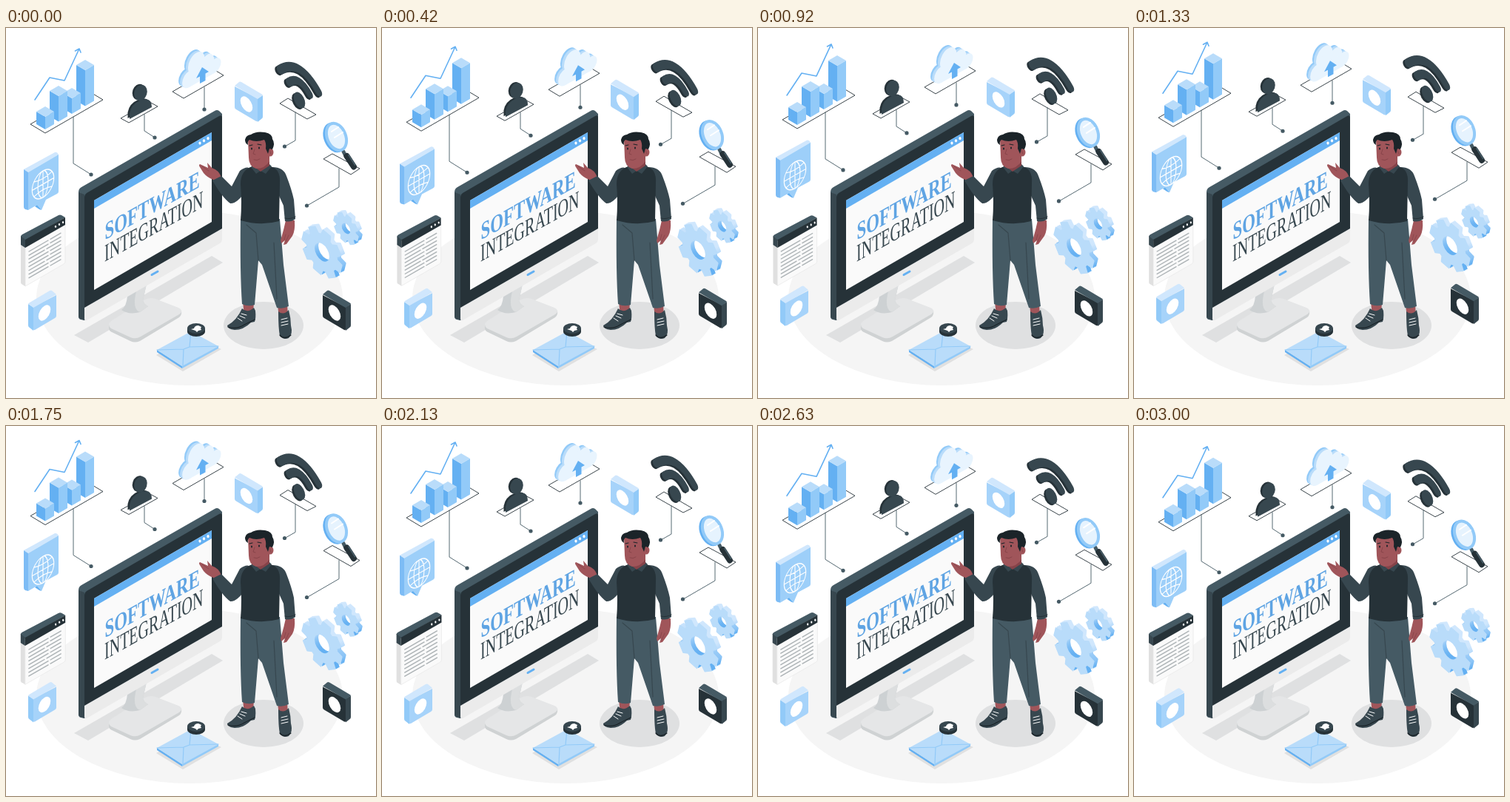
An HTML page for the animation above (3.04 s loop, 500 by 500 pixels).

```html
<!DOCTYPE html>
<html lang="en">
<head>
<meta charset="utf-8">
<title>Software integration</title>
<style>
html, body { margin: 0; width: 100%; height: 100%; overflow: hidden; background: #fff }
svg { display: block; width: 100%; height: 100% }
text { font: 33px "Liberation Serif", serif }
.bold { font-weight: 700 }
</style>
</head>
<body>
<svg id="stage" viewBox="0 0 500 500"></svg>
<script>
const NAVY = '#263238', SLATE = '#37474f', STEEL = '#455a64', BLACK = '#1b2429';
const BLUE = '#64b0f2', SKY = '#92caf8', SOFT = '#a6d3fa', PALE = '#b9dcfa', MIST = '#d0e7fd';
const SKIN = '#a0555a', SHADE = '#864349';
const LOOP = 3040;

const path = (d, fill, extra = '') => `<path d="${d}" fill="${fill}" ${extra}/>`;
const line = (d, color, width = 1) =>
  path(d, 'none', `stroke="${color}" stroke-width="${width}" stroke-linecap="round" stroke-linejoin="round"`);
const oval = (x, y, rx, ry, fill, extra = '') =>
  `<ellipse cx="${x}" cy="${y}" rx="${rx}" ry="${ry}" fill="${fill}" ${extra}/>`;
const group = (transform, body) => `<g transform="${transform}">${body}</g>`;
const rise = (height, body) => `<g data-rise="${height}">${body}</g>`;
// Isometric walls: one climbs to the right, the other falls to the right.
const wallUp = (x, y, body) => group(`matrix(.866 -.5 0 1 ${x} ${y})`, body);
const wallDown = (x, y, body) => group(`matrix(.866 .5 0 1 ${x} ${y})`, body);

// Outlined platform with its connector and end dot.
const platform = (outline, wire, x, y) =>
  path(outline, '#fff', `stroke="${NAVY}" stroke-width=".9"`) +
  line(wire, STEEL, .9) + oval(x, y, 2.6, 2.6, STEEL);

const bar = (x, top, bottom) =>
  path(`M${x} ${top + 7}l12 7V${bottom}l-12-7z`, BLUE) +
  path(`M${x + 12} ${top + 14}l12-7V${bottom - 7}l-12 7z`, SKY) +
  path(`M${x} ${top + 7}l12-7 12 7-12 7z`, PALE);

// Cube badge with a plain round sign on its face.
const tile = (x, y, flip, face, side, top) =>
  group(`translate(${x} ${y}) scale(${flip ? -1 : 1} 1)`,
    path('M0 7V35q0 2 2 3L29 54q2 1 2-1V23z', face) +
    path('M31 23l7-4V48q0 2-2 3l-5 4z', side) +
    path('M0 6L6 1q1-1 3 0L36 17q2 1 2 2l-7 5z', top) +
    wallDown(16, 31, oval(0, 0, 9.5, 9.5, '#fff')));

function gear(x, y, r) {
  let d = '';
  for (let i = 0; i < 8; i++)
    [[-.3, .76], [-.19, 1], [.19, 1], [.3, .76]].forEach(([a, k]) => {
      const t = i * Math.PI / 4 + a + .25;
      d += `${d ? 'L' : 'M'}${(r * k * Math.cos(t)).toFixed(2)} ${(r * k * Math.sin(t)).toFixed(2)}`;
    });
  const h = r * .4;
  d += `ZM${h} 0A${h} ${h} 0 1 0 ${-h} 0A${h} ${h} 0 1 0 ${h} 0Z`;
  const layer = (dx, fill) => wallDown(x + dx, y - dx * .57,
    path(d, fill, `fill-rule="evenodd" stroke="${fill}" stroke-width="2" stroke-linejoin="round"`));
  return [5, 3.5, 2].map(dx => layer(dx, 'url(#depth)')).join('') + layer(0, PALE);
}
const depth = `<linearGradient id="depth" x2="0" y2="1"><stop offset=".25" stop-color="${MIST}"/>` +
  `<stop offset=".7" stop-color="${BLUE}"/></linearGradient>`;

const floor =
  oval(248, 365, 207, 118, '#f5f5f5') +
  path('M92 415L278 308l15 9L111 425z', '#dfe0e1') +
  oval(348, 402, 54, 32, '#dfe0e1');

const chart =
  platform('M33 130L111 85l20 12L53 142z', 'M91 120V183L115 198', 115, 198) +
  bar(95, 43, 105.5) + bar(77, 81, 116) + bar(59, 78, 126.5) + bar(41, 106, 137) +
  line('M39 97L59 67 79 71 99 28M93.5 31l5.500-3 2 5', BLUE, 1.6);

const bust = color => path('M167 123V115Q169 103 181 98Q197 92 197 107z', color) +
  oval(182, 87.5, 8.5, 11, color, 'transform="rotate(18 182 87.5)"');
const user =
  platform('M155 122l11 6 39-22-11-6z', 'M187 117V139L201 148', 201, 148) +
  group('translate(-2.500 -1)', bust(NAVY)) + bust(SLATE);

const puff = fill =>
  oval(10, -11, 11, 11, fill) + oval(21, -27, 13, 14, fill) + oval(38, -17, 11, 13, fill) +
  oval(50, -9, 9.5, 9.5, fill) + path('M10-22L25-35 42-17 50 .5 10 0z', fill);
const cloud =
  platform('M225 86l15 9 54-31-15-9z', 'M268 80V109', 268, 110) +
  wallUp(234, 82, puff(SKY)) + wallUp(236, 83.500, puff(PALE)) + wallUp(239, 85, puff('#e8f4fe')) +
  path('M257 68L265 53 274 59 269.500 61.500V71L262 75V65.500z', BLUE);

const waves = color =>
  line('M-30-25Q0-57 30-25', color, 11) + line('M-16-15Q0-33 16-15', color, 10.5) +
  oval(0, 1, 9, 10, color);
const wifi =
  platform('M370 102l11-7 38 22-12 6z', 'M391 114V152L377 160', 376.500, 160) +
  wallDown(394, 98, waves(NAVY)) + wallDown(396.500, 96.500, waves(SLATE));

const ring = (x, y, color, fill) =>
  oval(x, y, 12.5, 19, fill, `stroke="${color}" stroke-width="4" transform="rotate(-22 ${x} ${y})"`);
const magnifier =
  platform('M429 177l12-7 37 20-12 8z', 'M450 190V215L407 240', 406.500, 240) +
  line('M456 167L460 175', STEEL, 5) + line('M460.500 173L470 187.500', NAVY, 8) +
  line('M463 171.500L471.500 185', STEEL, 2) +
  ring(444, 148, BLUE, 'none') + ring(446.500, 147, SKY, '#e6f3fe') +
  line('M440 140L449 134M444 148L455 141', '#fff', 2);

const bubble =
  path('M24 191L66 168q3-1 5 3L30 195z', MIST) +
  path('M24 191l6 4V246l-4-1q-2-1-2-3z', '#7dbcf5') +
  path('M30 195L71 171V221q0 2-2 3L54 232 48 246 42 239 30 246z', '#9dcff9') +
  path('M42 239l6 7-3-1-6-4z', BLUE);
const globe = wallUp(50, 211, line(
  'M-17 0a17 18 0 1 0 34 0a17 18 0 1 0-34 0M-8 0a8 18 0 1 0 16 0a8 18 0 1 0-16 0' +
  'M0-18V18M-17 0H17M-14-10Q0-5 14-10M-14 10Q0 5 14 10', '#fff', 1.3));

let rows = '';
for (let i = 0; i < 8; i++) {
  const gap = i % 3 == 2 ? 52 : 57;
  const at = x => `${x} ${(302 + i * 5.1 - (x - 31) * .577).toFixed(1)}`;
  rows += line(`M${at(31)}L${at(gap)}M${at(gap + 3)}L${at(74)}`, '#adb3b6', 1.4);
}
const page =
  path('M20 291l6 5V349l-5-3q-1-1-1-2z', '#e0e0e0') +
  path('M26 296L80 265V316q0 2-2 3L26 349z', '#fafafa', 'stroke="#e4e4e4" stroke-width=".6"') +
  path('M20 282q0-2 2-3L71 253q2-1 4 0l5 3L26 287z', STEEL) +
  path('M20 281l6 5V297l-6-4z', SLATE) +
  path('M26 286L80 256V266L26 297z', NAVY) +
  [67, 72, 77].map(x => oval(x, 292 - (x - 26) * .577, 1.1, 1.6, '#fff')).join('') + rows;

const envelope =
  path('M203 442L251 415 291 434 239 464z', '#e0e0e0') +
  path('M204 435V438L238 460V457z', BLUE) + path('M238 456V460L287 433V430z', SKY) +
  path('M204 435L250 410 287 430 238 457z', PALE) +
  line('M204 435L240 434 248 431 287 430M240 434L239 456M248 431L250 410', SKY, 1.2) +
  path('M245 406V410a12 7 0 0 0 24 0V406z', NAVY) + oval(257, 406, 12, 7, SLATE) +
  path('M250 407l4-1q1-4 6-4l4 2-1 2 1 2-4 1-2 2-2-2z', '#fff');

const monitor =
  path('M139 400V406q0 3 4 5L168 423q6 3 13 0L234 391q4-3 3-9z', '#cfd2d3') +
  path('M142 396L186 368q8-5 16-2L233 378q8 4 1 9L182 417q-7 4-14 1L142 406q-6-5 0-10z', '#e5e6e7') +
  path('M164 362L190 346 185 368Q186 373 192 376L181 384Q166 388 156 381Q163 376 164 362z', '#cdd1d3') +
  path('M176 356L190 346 185 368Q186 373 192 376L181 384Q170 380 176 356z', '#dcdedf') +
  path('M98 222q0-5 4-7L282 112q3-2 6 0l4 4V280L106 395l-5-1q-3-1-3-4z', STEEL) +
  path('M98 222l8 3V395l-5-2q-3-1-3-4z', SLATE) +
  path('M106 228q0-3 3-5L288 119q4-2 4 2V271L106 378z', NAVY) +
  path('M106 378L292 271V286q0 3-3 5L109 395q-3 1-3-2z', '#ebebeb') +
  path('M119 233L278 141V262L119 354z', '#fafafa') +
  path('M119 233L278 141V152L119 244z', BLUE) +
  [262, 267.500, 273].map(x => oval(x, 238.500 - (x - 119) * .58, 1.6, 2.1, '#fff')).join('') +
  line('M197 333.500L205 329', BLUE, 3) +
  group('matrix(.693 -.388 0 1 133.500 286.500)', '<text class="bold" fill="#5fa4e3">SOFTWARE</text>') +
  group('matrix(.607 -.338 0 1 133 316)', `<text fill="${SLATE}">INTEGRATION</text>`);

const man =
  // feet and shoes
  path('M320 370H335L334 386 322 388zM367 374L380 373 381 390 369 392z', SKIN) +
  path('M319 379Q326 386 335 378L337 382Q338 392 336 397L331 398Q321 408 309 408Q299 407 299 402Q312 395 319 379z', SLATE) +
  line('M300 404Q311 408 322 401L336 394', BLACK, 1.2) +
  line('M313 392l6 4M316 389l7 3M318 386l7 2', '#fff', 1) +
  path('M368 383Q375 389 382 381Q385 392 385 402Q388 414 382 419Q375 422 370 416Q368 406 368 383z', SLATE) +
  line('M370 415Q376 422 385 415', BLACK, 1.2) +
  line('M372 394l8-2M372 398l9-2M372 402l9-2', '#fff', 1) +
  // trousers
  path('M317 258H370L375 320 382 376Q374 380 366 378L346 320 341 314 336 374Q327 377 319 373Q316 330 317 258z', STEEL) +
  line('M341 314L338 277 325 266M366 366L362 290', SLATE, 1.2) +
  // far arm and hand
  path('M378 260H390Q391 274 387 281L379 292 375 293 377 287 372 291 371 287 375 273z', SKIN) +
  line('M378 279L376 286M382 280L378 289', SHADE, .8) +
  path('M360 188Q375 188 379 200Q386 218 389 232L391 258Q385 263 377 261L375 240 365 218z', SLATE) +
  line('M377 257Q384 259 391 255', NAVY, 1) +
  // raised arm and hand
  path('M291 202Q288 192 278 189L272 182 273 189 262 184Q260 185 262 188L267 196Q272 202 280 205L283 209z', SKIN) +
  line('M265 187L274 193', SHADE, .8) +
  path('M279 206L291 200 305 214 316 193Q326 185 332 191L325 219Q312 238 303 237Q292 229 279 206z', SLATE) +
  // sweater, collar and neck
  path('M330 188L357 187Q371 190 370 209L369 261Q344 268 317 260Q319 235 317 211Q317 194 330 188z', NAVY) +
  path('M331 188L335 182 355 183 359 187 351 197 344 193 338 197z', SLATE) +
  path('M335 176L356 170V186L344 194 335 187z', SHADE) +
  // head
  path('M327 150Q343 145 354 152L356 180Q350 190 338 190Q328 187 328 175z', SKIN) +
  oval(357, 168, 4.5, 5.5, SKIN) +
  path('M323 151Q324 145 331 144Q338 139 350 141Q360 143 360 150Q364 156 360 164L356 163 354 170 351 163Q352 155 349 151Q338 155 329 151Q326 153 327 158Q323 156 323 151z', BLACK) +
  oval(332, 163, 1, 1.5, BLACK) + oval(342, 162, 1, 1.5, BLACK) +
  line('M329 159l4-1M340 157l5 1', BLACK, 1.1) +
  line('M336 164l-2 6 3 1M335 178Q339 180 343 177M356 166l2 4', SHADE, .9);

const stage = document.getElementById('stage');
stage.innerHTML = depth + floor +
  [chart, user, cloud, wifi, magnifier,
    tile(309, 72, false, SOFT, SKY, MIST),
    tile(68, 354, true, SOFT, SKY, MIST),
    tile(428, 354, false, NAVY, SLATE, STEEL),
    gear(459.5, 271, 19), gear(427, 303, 31)].map(part => rise(10, part)).join('') +
  rise(27, bubble) + rise(20, globe) +
  `<g id="page">${page}</g>` + monitor + envelope + man;

const floats = [...stage.querySelectorAll('[data-rise]')];
const sheet = document.getElementById('page');
const start = performance.now();

function draw(now) {
  const p = Math.max(0, now - start) % LOOP / LOOP;
  const lift = 1 - Math.abs(1 - 2 * p);
  for (const el of floats)
    el.setAttribute('transform', `translate(0 ${-el.dataset.rise * lift})`);
  const s = 1 - .015 * Math.sin(2 * Math.PI * p);
  sheet.setAttribute('transform', `translate(50 300) scale(${s}) translate(-50 -300)`);
  requestAnimationFrame(draw);
}
draw(start);
</script>
</body>
</html>
```
